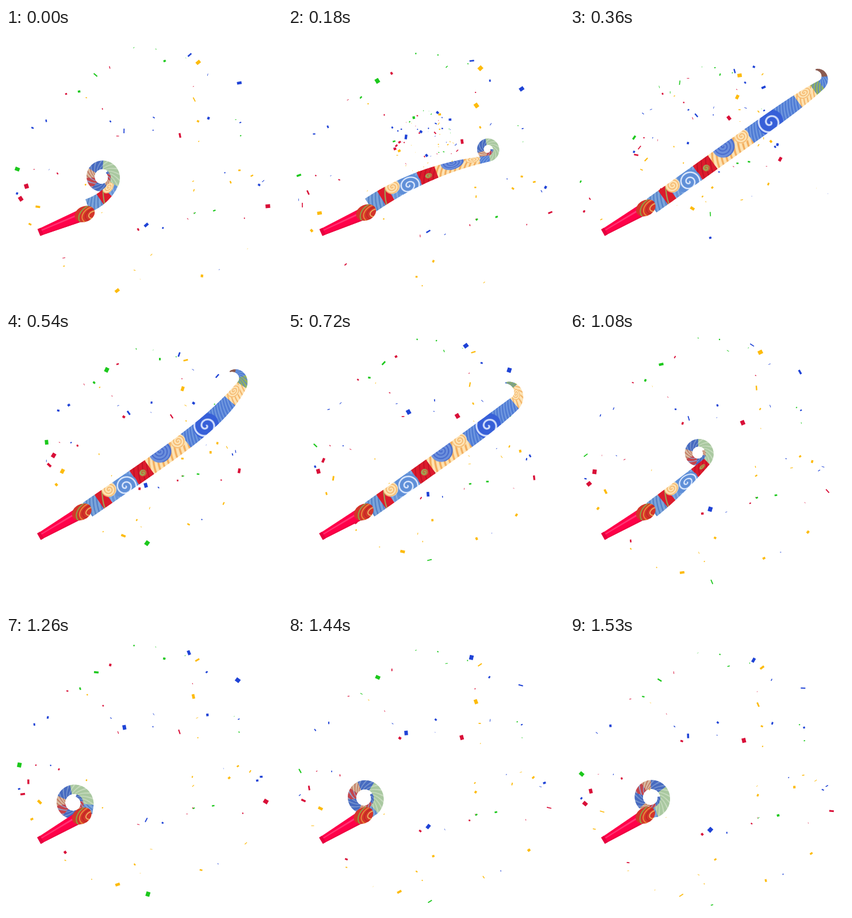
Write an HTML page with a canvas that moves like this. It is 480x480 px and loops after 1620 ms.

```html
<!DOCTYPE html>
<html lang="en">
<head>
<meta charset="utf-8">
<title>Party blower</title>
<style>
  html, body { margin: 0; width: 100%; height: 100%; overflow: hidden; background: #fff; }
  canvas { display: block; width: 480px; height: 480px; }
</style>
</head>
<body>
<canvas id="stage" width="480" height="480"></canvas>
<script>
const ctx = document.getElementById('stage').getContext('2d');
const LOOP = 1620, STEP = 90, RAD = Math.PI / 180;
const lerp = (a, b, k) => a + (b - a) * k;
const clamp01 = v => Math.max(0, Math.min(1, v));

let seed = 11;
const rand = () => (seed = (seed * 16807) % 2147483647) / 2147483647;

// Confetti: x and y are where a piece floats when the loop ends.
const BURST = { x: 240, y: 205, t: 0.09 }, DRAG = 3.2, FALL = 61;

function makePiece(color, x, y, size) {
  return {
    color, x, y, size,
    angle: rand() * 6.3, spin: rand() * 8 - 4,
    flip: rand() * 6.3, tumble: 4 + rand() * 6
  };
}

function scatter(color, count) {
  return Array.from({ length: count }, () => {
    const a = rand() * 6.3, r = 225 * Math.sqrt(lerp(0.12, 1, rand()));
    const size = 2 + 3 * rand() ** 1.5;
    return makePiece(color, 240 + r * Math.cos(a), 255 + r * Math.sin(a), size);
  });
}

// A few big pieces have fixed landing points, the rest are scattered.
const BIG = {
  '#fdbb0c': [[335, 58], [328, 123], [54, 311], [193, 458]],
  '#1f43d6': [[244, 343], [407, 94], [205, 178], [320, 45]],
  '#d90f38': [[34, 275], [24, 297], [457, 310], [303, 186]],
  '#1cc81c': [[18, 245], [155, 80], [247, 475]]
};
const pieces = Object.entries(BIG).flatMap(([color, spots], i) => [
  ...spots.map(([x, y]) => makePiece(color, x, y, 8)),
  ...scatter(color, 18 - 3 * i)
]);

function drawPiece(p, t) {
  const age = t - BURST.t;
  if (age <= 0) return;
  const pull = Math.exp(-DRAG * age);
  const float = time => p.y + FALL * (time - LOOP / 1000);
  const x = p.x + (BURST.x - p.x) * pull;
  const y = float(t) + (BURST.y - float(BURST.t)) * pull;
  const size = p.size * Math.min(1, 0.4 + age * 2)
    - 22 * Math.max(0, t - 1.8)
    - Math.max(0, Math.hypot(x - 240, y - 230) - 234);
  if (size < 0.8) return;
  ctx.save();
  ctx.translate(x, y);
  ctx.rotate(p.angle + p.spin * t);
  ctx.scale(1, 0.2 + 0.7 * Math.cos(p.flip + p.tumble * t) ** 2);
  ctx.fillStyle = p.color;
  ctx.fillRect(-size / 2, -size / 2, size, size);
  ctx.restore();
}

// Paper strips, painted flat and bent along the blower later.
const H = 30;
function strip(width, base, paint) {
  const c = document.createElement('canvas');
  c.width = width;
  c.height = H;
  const g = c.getContext('2d');
  g.fillStyle = base;
  g.fillRect(0, 0, width, H);
  paint(g);
  return c;
}

function swirl(g, x, y, r, base, line, gap, width) {
  g.save();
  g.fillStyle = base;
  g.beginPath();
  g.arc(x, y, r, 0, 7);
  g.fill();
  g.clip();
  g.strokeStyle = line;
  g.lineWidth = width;
  g.beginPath();
  for (let a = 0, d = 0; d < r; a += 0.2, d = a * gap / 6.28) {
    g.lineTo(x + d * Math.cos(a), y + d * Math.sin(a));
  }
  g.stroke();
  g.restore();
}

// A coloured section crossed by curved, slanting pencil lines.
function section(g, x, w, color, line, gap = 7, width = 2) {
  g.save();
  g.beginPath();
  g.rect(x, 0, w, H);
  g.clip();
  g.fillStyle = color;
  g.fillRect(x, 0, w, H);
  g.strokeStyle = line;
  g.lineWidth = width;
  for (let u = x - 14; u < x + w; u += gap) {
    g.beginPath();
    g.moveTo(u, H);
    g.quadraticCurveTo(u + 4, H / 2, u + 14, 0);
    g.stroke();
  }
  g.restore();
}

const BLUE = '#4f7bd4', SKY = '#7ba4da', DEEP = '#365fd8', CREAM = '#fde3b4',
  ORANGE = '#f3ad5c', RED = '#dc1a2c', GREEN = '#93b45c';

const front = strip(460, '#8a5a50', g => {
  section(g, 0, 24, SKY, '#4d7cc4');
  section(g, 24, 18, RED, GREEN, 16);
  section(g, 42, 58, '#6795d8', '#8db2e4');
  section(g, 98, 34, RED, '#b80f25', 9, 1.5);
  section(g, 130, 78, CREAM, ORANGE, 9, 3.4);
  section(g, 208, 104, BLUE, '#789fe2', 6);
  section(g, 312, 34, CREAM, ORANGE, 7);
  section(g, 346, 16, GREEN, '#5d86c4', 6);
  section(g, 362, 16, BLUE, SKY, 6);
  swirl(g, 77, 19, 22, '#5f8fd8', '#e4eeff', 9, 2.4);
  swirl(g, 161, 3, 20, '#6c8fdc', '#4468cc', 6, 2);
  swirl(g, 252, 17, 23, DEEP, '#d4e0fb', 13, 3.2);
  swirl(g, 115, 17, 6, GREEN, '#d94a2a', 4, 1.4);
  for (const x of [50, 197, 330]) swirl(g, x, 7, 13, CREAM, ORANGE, 5, 1.5);
});

const back = strip(260, SKY, g => {
  section(g, 0, 48, '#a9c8a0', '#c9dcc0', 8);
  for (let x = 48; x < 260; x += 50) {
    section(g, x, 22, '#466ac0', '#7d9ad0', 8);
    section(g, x + 22, 13, '#d8bca2', '#c0705a', 6);
    section(g, x + 35, 15, '#c4444c', '#8fa8d4', 9);
  }
});

// Key poses: time, unrolled length, heading, bend, mouthpiece angle
const POSES = [
  [0, 58, -20, -38, -22],
  [180, 224, -34, 25, -24],
  [360, 362, -35.5, 0, -30],
  [540, 345, -34.5, -22, -30],
  [900, 278, -36, 12, -30],
  [1080, 125, -38, -6, -30],
  [1260, 14, -84, 0, -30],
  [1530, 7, -20, 0, -31]
];

function poseAt(ms) {
  const i = POSES.findLastIndex(p => p[0] <= ms);
  const a = POSES[i], b = POSES[i + 1] || [LOOP, ...POSES[0].slice(1)];
  const k = (ms - a[0]) / (b[0] - a[0]);
  const [, len, head, bend, mouth] = a.map((v, j) => lerp(v, b[j], k));
  return { len, head, bend, mouth };
}

// The curl is tight and many-layered until the paper is nearly straight.
function curlFor(len) {
  const k = len / 224, rest = 362 - len;
  const open = clamp01((len - 230) / 40);
  const mix = (closed, opened) => lerp(closed, opened, open);
  return {
    r0: mix(27 - 11 * k, 15 + rest * 0.12),
    r1: mix(18 - 7 * k, 14 + rest * 0.12),
    turn: mix(430, 145) * RAD,
    base: Math.min(14.5, 7 + len * 0.08),
    neck: mix(9 - 4 * k, 8 + rest * 0.07),
    tip: mix(6, 0.8),
    power: mix(1.5, 8),
    bendPower: mix(1, 4),
    tex: open < 0.5 ? back : front
  };
}

function drawPaper({ len, head, bend }) {
  const c = curlFor(len), arc = c.turn * (c.r0 + c.r1) / 2, ds = 1.25;
  const slices = [];
  let x = 142, y = 309, angle = 0;
  for (let s = 0; s < len + arc; s += ds) {
    const curl = s > len, f = (s - len) / arc, k = s / len;
    if (curl) angle -= ds / lerp(c.r0, c.r1, f);
    else angle = (head + bend * k ** c.bendPower) * RAD;
    x += ds * Math.cos(angle);
    y += ds * Math.sin(angle);
    const half = curl ? lerp(c.neck, c.tip, f) : lerp(c.base, c.neck, k ** c.power);
    const rolled = curl && c.tex === back;
    slices.push([x, y, angle, half, rolled ? back : front, rolled ? s - len : s]);
  }
  for (const [px, py, a, half, tex, u] of slices.reverse()) {
    ctx.save();
    ctx.translate(px, py);
    ctx.rotate(a);
    ctx.drawImage(tex, Math.min(u, tex.width - 2), 0, 2, H, -1.2, -half, 2.4, half * 2);
    ctx.restore();
  }
}

function drawMouthpiece(angle) {
  const cone = (color, top, low) => {
    ctx.fillStyle = color;
    ctx.beginPath();
    ctx.moveTo(-1, top * 6);
    ctx.lineTo(76, top * 10.5);
    ctx.lineTo(76, low * 10.5);
    ctx.lineTo(-1, low * 6);
    ctx.fill();
  };
  ctx.save();
  ctx.translate(59, 355);
  ctx.rotate(angle * RAD);
  cone('#ff0049', -1, 1);
  cone('#ff3474', -0.45, -0.15);
  cone('#ec0040', 0.75, 1);
  ctx.fillStyle = '#e6003f';
  ctx.fillRect(-2, -6.5, 6, 13);

  ctx.beginPath();
  ctx.ellipse(84, 0, 18, 13.5, 0, 0, 7);
  ctx.clip();
  ctx.fillStyle = '#d4352a';
  ctx.fillRect(60, -16, 50, 32);
  ctx.lineWidth = 2;
  ['#8ea043', '#e8893a', '#c22823', '#eba95c'].forEach((color, i) => {
    ctx.strokeStyle = color;
    ctx.beginPath();
    ctx.ellipse(98, 7, 27 - i * 6, 18 - i * 4, 0, 0, 7);
    ctx.stroke();
  });
  ctx.restore();
}

function frame(now) {
  const ms = Math.floor((now % LOOP) / STEP) * STEP;
  ctx.fillStyle = '#fff';
  ctx.fillRect(0, 0, 480, 480);
  for (const p of pieces) {
    drawPiece(p, ms / 1000);
    drawPiece(p, (ms + LOOP) / 1000);
  }
  const pose = poseAt(ms);
  drawPaper(pose);
  drawMouthpiece(pose.mouth);
}

const start = performance.now();
function tick() {
  frame(performance.now() - start);
  requestAnimationFrame(tick);
}
tick();
</script>
</body>
</html>
```
